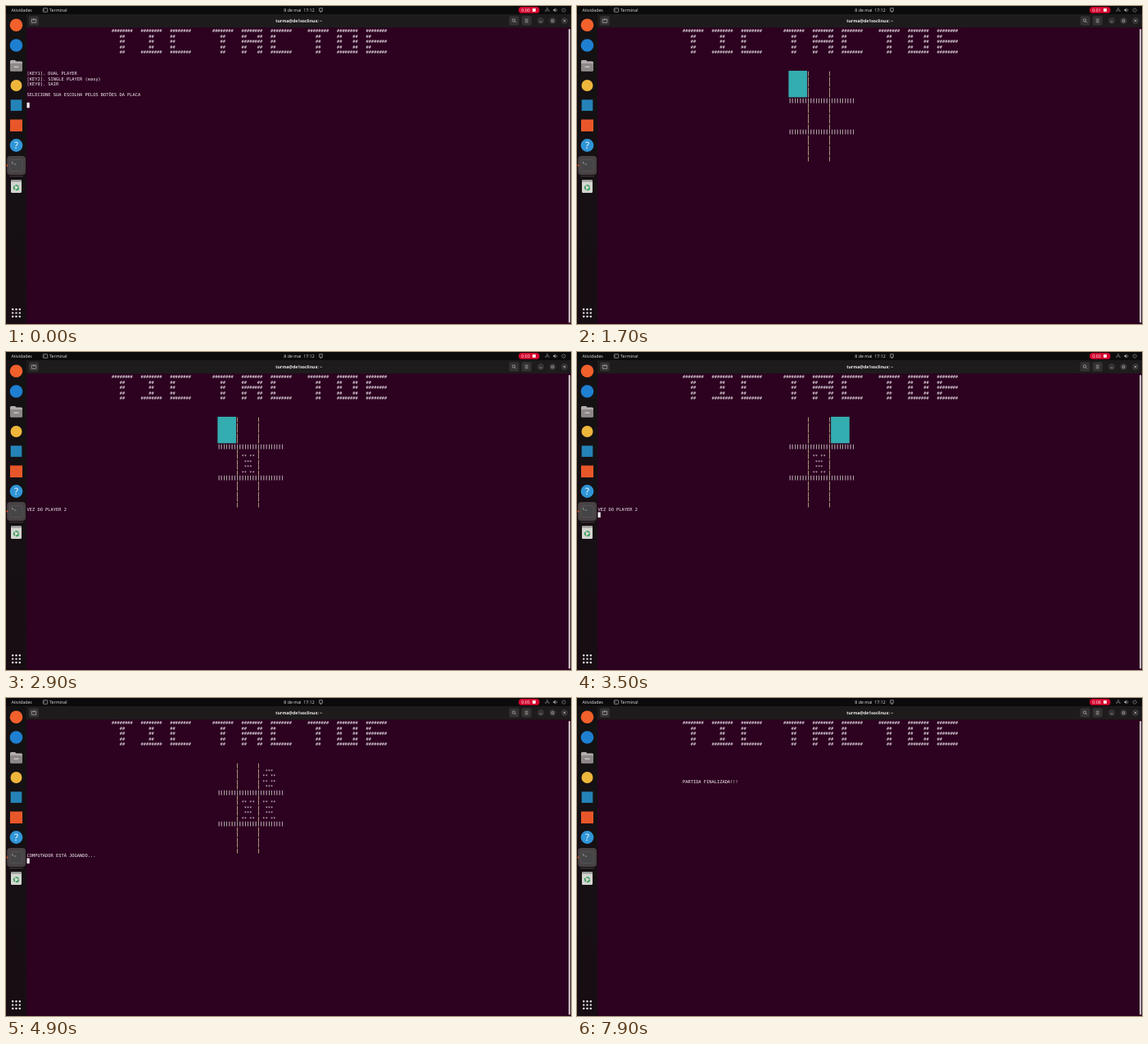
Write an HTML page that moves like this. It is 690x388 px and loops after 8000 ms.

```html
<!DOCTYPE html>
<html lang="pt-BR">
<head>
<meta charset="utf-8">
<title>Terminal</title>
<style>
  html, body { margin: 0; width: 100%; height: 100%; overflow: hidden; background: #2c0220; }
  svg { display: block; width: 100%; height: 100%; }
  text { white-space: pre; text-rendering: geometricPrecision; }
  .mono { font: 5.372px "DejaVu Sans Mono", monospace; fill: #f6eff3; }
  .bar { stroke: currentColor; stroke-width: .22; fill: currentColor; color: #efe6e6; }
  .rule { color: #ead7a4; }
  .ui { font: 5.3px "Open Sans", sans-serif; fill: #e6e6e6; }
  .line { fill: none; stroke: #c4c4c4; stroke-width: .65; }
</style>
</head>
<body>
<svg viewBox="0 0 690 388" preserveAspectRatio="none">
  <defs>
    <linearGradient id="side" x1="0" y1="0" x2="0" y2="1">
      <stop offset="0" stop-color="#141213"/>
      <stop offset="1" stop-color="#170d13"/>
    </linearGradient>
  </defs>
  <rect width="690" height="388" fill="#2c0220"/>

  <!-- dock -->
  <rect y="10" width="25" height="378" fill="url(#side)"/>
  <circle cx="12.5" cy="23.3" r="7.8" fill="#f2602c"/>
  <circle cx="12.5" cy="48" r="7.8" fill="#1f7fd0"/>
  <path d="M5 67.5q0-1.5 1.5-1.5H11l1.5 1.5h6q1.5 0 1.5 1.5v9q0 1.5-1.5 1.5h-12Q5 79.5 5 78z" fill="#b3adad"/>
  <rect x="5" y="70" width="15" height="9.5" rx="1.3" fill="#8e8888"/>
  <rect x="9.5" y="73.5" width="6" height="1.4" rx=".6" fill="#c9c4c4"/>
  <circle cx="12.5" cy="97" r="7" fill="#efb63c"/>
  <rect x="5.7" y="114.3" width="13.6" height="13.6" fill="#2583b8"/>
  <rect x="5" y="138.5" width="15" height="14.5" fill="#e8572a"/>
  <circle cx="12.5" cy="170" r="7.9" fill="#3095d6"/>
  <text class="ui" x="12.5" y="174" text-anchor="middle" style="font-size:11.5px;fill:#fff">?</text>
  <rect x="1.2" y="183" width="22.8" height="23" rx="4" fill="#484244"/>
  <rect x="4.8" y="187.5" width="15.4" height="14" rx="1.8" fill="#454446" stroke="#5f5d5f" stroke-width=".6"/>
  <path class="line" d="M7 190l1.7 1.3L7 192.600M9.700 193h2.500"/>
  <circle cx="1.5" cy="194.6" r="1" fill="#e95420"/>
  <path d="M4 207.7h17" stroke="#565153" stroke-width=".7"/>
  <rect x="6" y="212" width="13" height="16" rx="1.6" fill="#d3d5d0"/>
  <rect x="6" y="212" width="13" height="2.6" rx="1.2" fill="#9a9c98"/>
  <circle cx="12.5" cy="221.6" r="2.8" fill="none" stroke="#2f9a52" stroke-width="1.6" stroke-dasharray="4.600 1.260"/>
  <g id="apps" fill="#f2f2f2"></g>

  <!-- top bar -->
  <rect width="690" height="10" fill="#0c0b0c"/>
  <text class="ui" x="6.4" y="6.8">Atividades</text>
  <rect class="line" x="45.3" y="2.7" width="5.4" height="4.6" rx=".8"/>
  <path class="line" d="M46.500 4.200l.8.7-.8.7"/>
  <text class="ui" x="53" y="6.8">Terminal</text>
  <text class="ui" x="358" y="6.8" text-anchor="middle">8 de mai  17:12</text>
  <path class="line" d="M382.700 6.300v-3.600h3.600v3.600zM383.700 7.500h1.600"/>
  <rect x="626" y="1" width="25.5" height="7.8" rx="3.9" fill="#d4062f"/>
  <text class="ui" id="clock" x="629.3" y="6.8" style="fill:#fff">0:00</text>
  <rect x="643" y="3" width="3.8" height="3.8" fill="#fff"/>
  <g opacity=".75">
    <path class="line" d="M661 2.500v2.500M659 7v-2h4v2M660.200 2.500h1.600"/>
    <path d="M668.300 4h1.200l1.700-1.500v5l-1.700-1.500h-1.200z" fill="#c4c4c4"/>
    <path class="line" d="M672.300 3.500q1.200 1.500 0 3"/>
    <path class="line" d="M679.800 3.200a2.200 2.200 0 1 0 2.600 0M681.100 2v2.700"/>
  </g>

  <!-- window header -->
  <rect x="25" y="10" width="665" height="16.3" fill="#1d1b1c"/>
  <g fill="#333132">
    <rect x="28" y="12.3" width="12" height="11.5" rx="2"/>
    <rect x="614.5" y="12.3" width="12" height="11.5" rx="2"/>
    <rect x="629.7" y="12.3" width="12" height="11.5" rx="2"/>
    <circle cx="653" cy="18" r="4.2"/>
    <circle cx="667.5" cy="18" r="4.2"/>
    <circle cx="682" cy="18" r="4.2"/>
  </g>
  <path class="line" d="M32.500 16h-1.200v4.300h5.400V16h-1.200M34 15v3M32.700 16.500h2.600"/>
  <circle class="line" cx="620" cy="17.5" r="1.7"/>
  <path class="line" d="M621.300 18.800l1.600 1.600M633.700 16.200h4M633.700 18h4M633.700 19.800h4M651.600 19.200h2.800M666.200 16.800h2.600v2.600h-2.600zM680.700 16.700l2.600 2.600M683.300 16.700l-2.600 2.600"/>
  <text class="ui" x="357.7" y="19.9" text-anchor="middle" style="font-size:5.150px;font-weight:700;fill:#f4f4f4">turma@de1soclinux: ~</text>

  <!-- terminal -->
  <rect x="687" y="28" width="2.2" height="358.5" rx="1" fill="#c6bdc1"/>
  <rect id="pick" fill="#34adb0"/>
  <g id="title" class="mono"></g>
  <g id="menu" class="mono"></g>
  <g id="board" class="mono"></g>
  <g id="end" class="mono"></g>
  <rect id="cursor" x="25.5" width="3.23" height="6.46" fill="#f5f0f3"/>
</svg>
<script>
const NS = "http://www.w3.org/2000/svg";
const LOOP = 8000, CW = 690 / 1920 * 9, RH = CW * 2, X0 = 25.5, Y0 = 27.27;
const $ = id => document.getElementById(id);
const colX = c => X0 + c * CW;
const rowY = r => Y0 + r * RH;

function set(el, attrs) {
  for (const k in attrs) el.setAttribute(k, attrs[k]);
  return el;
}
function add(parent, tag, attrs, content) {
  const el = set(document.createElementNS(NS, tag), attrs);
  if (content) el.textContent = content;
  return parent.appendChild(el);
}
function put(parent, row, col, str, cls = "") {
  return add(parent, "text", { x: colX(col), y: rowY(row) + 5.15, class: cls }, str);
}
function show(el, on) { el.setAttribute("visibility", on ? "inherit" : "hidden"); }

// Launcher dots
for (let i = 0; i < 9; i++)
  add($("apps"), "rect", { x: 7.1 + i % 3 * 4.3, y: 369.1 + Math.floor(i / 3) * 4.3, width: 2.2, height: 2.2, rx: .6 });

// Banner letters, five rows each
const F = "########", L = "##", M = "   ##", S = "##    ##";
const GLYPHS = {
  T: [F, M, M, M, M], I: [F, M, M, M, F], C: [F, L, L, L, F],
  A: [F, S, F, S, S], O: [F, S, S, S, F], E: [F, L, F, L, F]
};
["TIC", "TAC", "TOE"].forEach((word, w) => [...word].forEach((ch, i) =>
  GLYPHS[ch].forEach((s, r) => put($("title"), r, [32, 70, 106][w] + i * 11, s))));

["[KEY1]. DUAL PLAYER", "[KEY2]. SINGLE PLAYER (easy)", "[KEY0]. SAIR", "",
 "SELECIONE SUA ESCOLHA PELOS BOTÕES DA PLACA"].forEach((s, i) => put($("menu"), 8 + i, 0, s));
put($("end"), 11, 32, "PARTIDA FINALIZADA!!!");

// Board
const board = $("board");
for (let r = 8; r < 25; r++) {
  if (r === 13 || r === 19) put(board, r, 72, "|".repeat(25), "bar");
  else for (const c of [79, 87]) put(board, r, c, "|", "bar rule");
}
const MARKS = {
  X: ["** **", " ***", " ***", "** **"],
  O: [" ***", "** **", "** **", " ***"]
};
const moves = [["X", 1, 1, 2300], ["O", 2, 0, 3900], ["X", 2, 1, 4900]].map(([m, cx, cy, from]) => {
  const g = add(board, "g", {});
  MARKS[m].forEach((s, i) => put(g, 9 + cy * 6 + i, 73 + cx * 8, s));
  return { g, from };
});
const message = put(board, 25, 0, "");
set($("pick"), { y: rowY(8), width: 7 * CW, height: 5 * RH });

// Last value whose start time has passed
const at = (t, steps) => steps.reduce((v, [from, val]) => t >= from ? val : v, null);
const CPU = "COMPUTADOR ESTÁ JOGANDO...", TURN = "VEZ DO PLAYER 2";
const SCENES = [[0, "menu"], [1200, "board"], [5200, "end"]];
const MESSAGES = [[0, ""], [1900, CPU], [2700, TURN], [4500, CPU]];
const PICKS = [[0, -1], [1200, 0], [1900, -1], [2700, 0], [3300, 1], [3400, 2], [4500, -1]];

function render(t) {
  const scene = at(t, SCENES), msg = at(t, MESSAGES), pick = at(t, PICKS);
  for (const id of ["menu", "board", "end"]) show($(id), id === scene);
  for (const m of moves) show(m.g, t >= m.from);
  if (message.textContent !== msg) message.textContent = msg;

  show($("pick"), pick >= 0);
  set($("pick"), { x: colX(72 + Math.max(pick, 0) * 8) });

  const row = { menu: 14, board: msg ? 26 : 25, end: 12 }[scene];
  set($("cursor"), { y: rowY(row) });
  show($("cursor"), Math.floor((t + 100) / 600) % 2 === 0);
  $("clock").textContent = "0:0" + Math.floor((t + 100) / 1000);
}

const start = performance.now();
function tick() {
  render((performance.now() - start) % LOOP);
  requestAnimationFrame(tick);
}
render(0);
requestAnimationFrame(tick);
</script>
</body>
</html>
```
